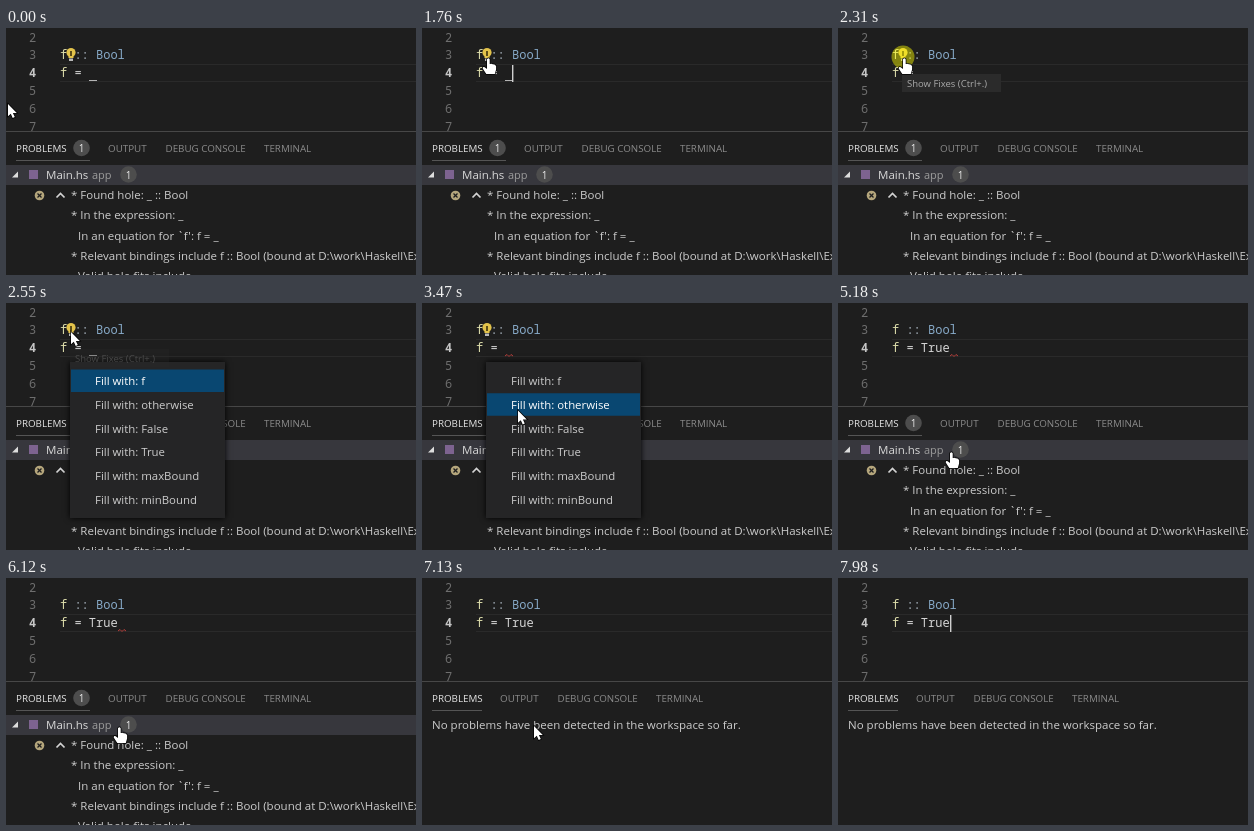
Animation, 410 px wide and 247 px high, one loop 8000 ms. Source, as an HTML page with a canvas:

```html
<!DOCTYPE html>
<html lang="en">
<head>
<meta charset="utf-8">
<title>Filling a typed hole</title>
<style>
  html, body { margin: 0; width: 100%; height: 100%; overflow: hidden; background: #1e1e1e; }
  canvas { display: block; width: 410px; height: 247px; }
</style>
</head>
<body>
<canvas></canvas>
<script>
const W = 410, H = 247, LOOP = 8000, STEP = 77;
const canvas = document.querySelector('canvas');
const ctx = canvas.getContext('2d');
const ratio = window.devicePixelRatio || 1;
canvas.width = W * ratio;
canvas.height = H * ratio;

const CODE = '12px "Noto Sans Mono", "DejaVu Sans Mono", monospace';
const ui = size => `${size}px "Open Sans", "Noto Sans", sans-serif`;

const ARROW = new Path2D('M0 0V12.2L2.8 9.7L4.7 14L6.8 13.1L4.9 8.9H8.8Z');
const HAND = new Path2D('M-1.5 1.2Q0 -.6 1.2 1.2V6L3 5.7L4.2 6.3L6 6.5L7.6 8V11.5L6.3 16H-2.2L-5.8 10.4Q-5.8 8.4 -3.8 9.2L-1.5 11Z');
const SQUIGGLE = new Path2D('M0 1.5L2 0L4 2L6 0L8 1.5');

const CARET_ON = [[440, 940], [1440, 1930], [4640, 5180], [5670, 6120], [6670, 7130], [7590, 8000]];
const FIXES = ['f', 'otherwise', 'False', 'True', 'maxBound', 'minBound'];
const MENU_OPEN = 2320, FILLED = 4640, SOLVED = 6500;

const between = (t, a, b) => t >= a && t < b;
const clamp = v => Math.max(0, Math.min(1, v));
const stepped = (t, start, n) => clamp((Math.floor((t - start) / STEP) + 1) / n);

function text(str, x, y, color, font) {
  ctx.font = font;
  ctx.fillStyle = color;
  ctx.fillText(str, x, y);
}

function rect(x, y, w, h, color) {
  ctx.fillStyle = color;
  ctx.fillRect(x, y, w, h);
}

function disc(x, y, r, color) {
  ctx.fillStyle = color;
  ctx.beginPath();
  ctx.arc(x, y, r, 0, 7);
  ctx.fill();
}

function line(color, width, ...points) {
  ctx.strokeStyle = color;
  ctx.lineWidth = width;
  ctx.beginPath();
  points.forEach(([x, y]) => ctx.lineTo(x, y));
  ctx.stroke();
}

function badge(x, y) {
  disc(x, y, 8.3, '#4d4d4d');
  ctx.textAlign = 'center';
  text('1', x, y + 4, '#eee', ui(10));
  ctx.textAlign = 'left';
}

function squiggle(x, y) {
  ctx.save();
  ctx.translate(x, y);
  ctx.strokeStyle = '#b8403c';
  ctx.lineWidth = 1;
  ctx.stroke(SQUIGGLE);
  ctx.restore();
}

function bulb() {
  disc(65, 24.5, 4.6, '#e3c34b');
  rect(62.5, 27, 5, 3, '#e3c34b');
  rect(63, 30.5, 4, 2.5, '#b9b9b9');
  rect(64, 23, 2, 5, '#5c4d18');
}

function editor(t) {
  rect(54, 36, W - 54, 1, '#2a2a2a');
  rect(54, 53, W - 54, 1, '#2a2a2a');
  [14, 31, 49, 67, 85, 103].forEach((y, i) => {
    const current = i === 2;
    text(i + 2, 23, y, current ? '#c6c6c6' : '#6e6e6e', (current ? 'bold ' : '') + CODE);
  });

  text('f', 54, 31, '#dcdcaa', CODE);
  text('::', 68.4, 31, '#a9b4bf', CODE);
  text('Bool', 90, 31, '#86a8c6', CODE);
  text('f', 54, 49, '#dcdcaa', CODE);
  text('=', 68.4, 49, '#d4d4d4', CODE);

  if (t < FILLED) {
    if (t < 2630) rect(83, 52, 8, 1, '#b4b4b4');
    else squiggle(83, 51.5);
    bulb();
  } else {
    text('True', 82.8, 49, '#d4d4d4', CODE);
    if (t < SOLVED) squiggle(112, 51.5);
  }
  if (CARET_ON.some(([a, b]) => between(t, a, b))) {
    rect(t < FILLED ? 90 : 112, 37, 1.4, 17, '#d0d0d0');
  }
}

function problemList() {
  const font = ui(11.5);
  rect(0, 137, W, 20, '#37373d');
  ctx.fillStyle = '#ddd';
  ctx.fill(new Path2D('M6 149.5H12V143.5Z'));
  rect(23, 142, 9, 9, '#7d6390');
  text('Main.hs', 40, 151, '#d8d8d8', font);
  text('app', 86, 151, '#9d9d9d', ui(11));
  badge(122.5, 146.5);

  disc(33.5, 167.5, 4.8, '#b5a67c');
  line('#1e1e1e', 1.3, [31.5, 165.5], [35.5, 169.5]);
  line('#1e1e1e', 1.3, [35.5, 165.5], [31.5, 169.5]);
  line('#d4d4d4', 1.7, [50.5, 169.5], [54.5, 165.5], [58.5, 169.5]);

  [
    [65, '* Found hole: _ :: Bool'],
    [65, '* In the expression: _'],
    [72, "In an equation for `f': f = _"],
    [65, '* Relevant bindings include f :: Bool (bound at D:\\work\\Haskell\\Ex'],
    [72, 'Valid hole fits include']
  ].forEach(([x, str], i) => text(str, x, Math.round(171 + i * 20.3), '#ccc', font));
}

function panel(t) {
  const solved = t >= SOLVED, shift = solved ? -24 : 0;
  rect(0, 103, W, H - 103, '#1e1e1e');
  rect(0, 103, W, 1, '#474747');
  text('PROBLEMS', 10, 124, '#e7e7e7', ui(9.8));
  text('OUTPUT', 102 + shift, 124, '#8c8c8c', ui(9.8));
  text('DEBUG CONSOLE', 159.5 + shift, 124, '#8c8c8c', ui(9.8));
  text('TERMINAL', 258 + shift, 124, '#8c8c8c', ui(9.8));
  rect(10, 132, solved ? 50 : 74, 1, '#555');
  if (solved) {
    text('No problems have been detected in the workspace so far.', 10, 151, '#ccc', ui(11.5));
  } else {
    badge(75.5, 120);
    problemList();
  }
}

function menu(pointerY) {
  const selected = Math.max(0, Math.floor((pointerY - 66.5) / 23.75));
  ctx.save();
  ctx.shadowColor = '#000';
  ctx.shadowBlur = 6;
  rect(64, 59, 155, 156, '#252526');
  ctx.restore();
  rect(65, 66.5 + selected * 23.75, 153, 22.5, '#094771');
  FIXES.forEach((fix, i) => {
    text('Fill with: ' + fix, 89, Math.round(82 + i * 23.8), i === selected ? '#fff' : '#ccc', ui(11.4));
  });
}

function tooltip(t) {
  const alpha = Math.min(clamp((t - 2080) / 160), clamp((2640 - t) / 300));
  if (!alpha) return;
  ctx.globalAlpha = alpha;
  rect(64, 46, 99, 18, '#2b2b2b');
  text('Show Fixes (Ctrl+.)', 69, 58.5, '#aaa', ui(9.5));
  ctx.globalAlpha = 1;
}

function pointerAt(t) {
  if (t < 3160) {
    const p = stepped(t, 750, 11), e = p * p * (3 - 2 * p);
    return [2 + 63 * e, 76 - 47 * e];
  }
  if (t < 7590) {
    const e = 1 - (1 - stepped(t, 3160, 12)) ** 2;
    return [65 + 47 * e, 29 + 119 * e];
  }
  const e = stepped(t, 7590, 6) ** 2;
  return [112 + 39 * e, 148 + 114 * e];
}

function pointer(t, x, y) {
  if (between(t, 2160, MENU_OPEN) || between(t, 4480, FILLED)) disc(x, y, 11.5, 'rgba(255,255,0,.45)');
  const hand = between(t, 1610, MENU_OPEN) || between(t, FILLED, SOLVED);
  const shape = hand ? HAND : ARROW;
  ctx.save();
  ctx.translate(hand ? x + 1.5 : x, hand ? y + 1 : y);
  ctx.strokeStyle = '#000';
  ctx.lineWidth = 1.4;
  ctx.stroke(shape);
  ctx.fillStyle = '#fff';
  ctx.fill(shape);
  ctx.restore();
}

function draw() {
  const t = performance.now() % LOOP;
  const [x, y] = pointerAt(t);
  ctx.setTransform(ratio, 0, 0, ratio, 0, 0);
  rect(0, 0, W, H, '#1e1e1e');
  editor(t);
  panel(t);
  if (between(t, MENU_OPEN, FILLED)) menu(y);
  tooltip(t);
  pointer(t, x, y);
  requestAnimationFrame(draw);
}
draw();
</script>
</body>
</html>
```
